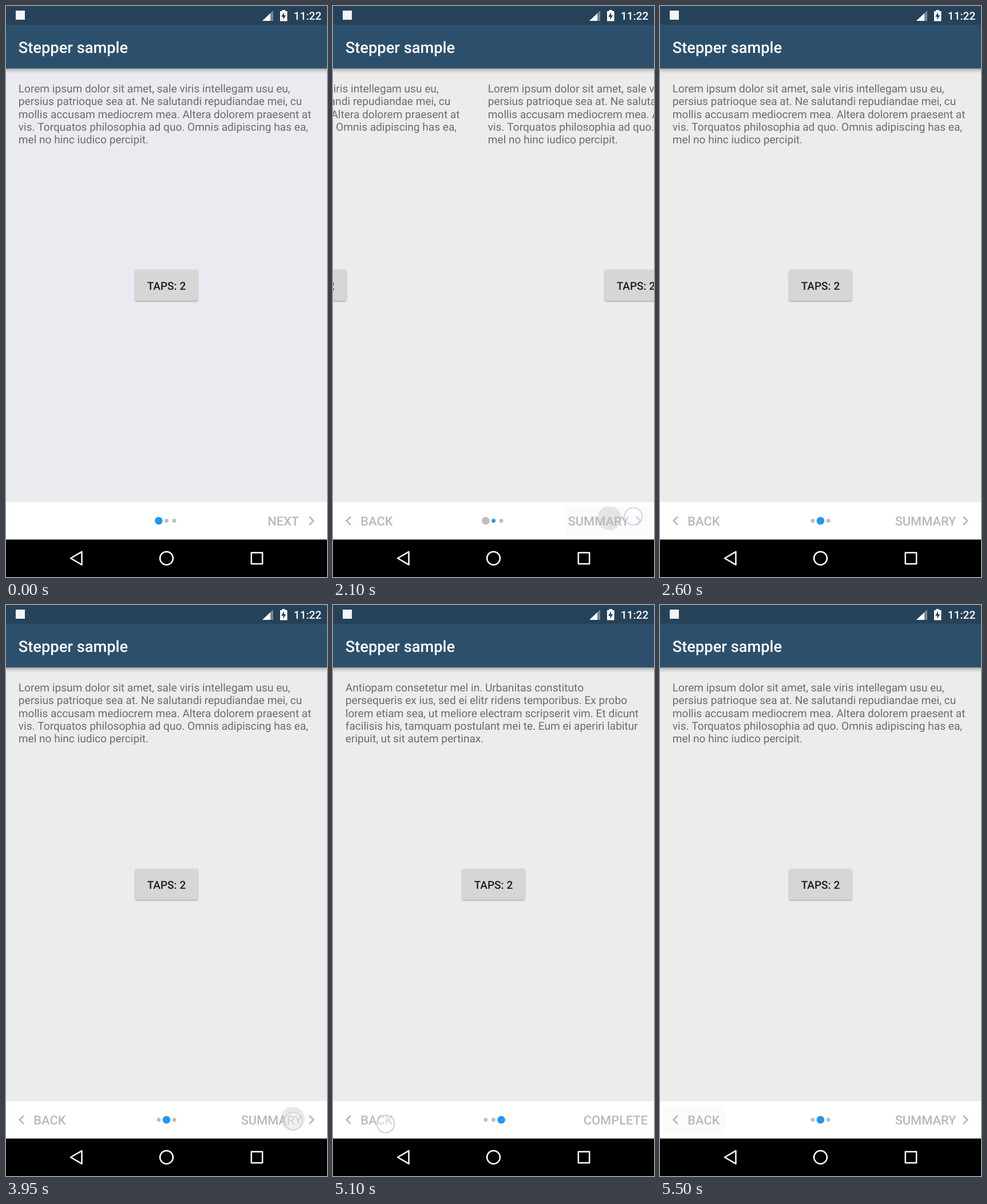
An HTML page with a canvas for the animation above (6.05 s loop, 561 by 998 pixels).

```html
<!DOCTYPE html>
<html lang="en">
<head>
<meta charset="utf-8">
<title>Stepper sample</title>
<style>
  html, body { margin: 0; width: 100%; height: 100%; overflow: hidden; background: #000; }
  canvas { display: block; }
</style>
</head>
<body>
<canvas id="stage" width="561" height="998"></canvas>
<script>
const WIDTH = 561, LOOP = 6050, STEP = 50;
const ctx = document.getElementById('stage').getContext('2d');
ctx.textRendering = 'geometricPrecision';

const LOREM = [
  'Lorem ipsum dolor sit amet, sale viris intellegam usu eu,',
  'persius patrioque sea at. Ne salutandi repudiandae mei, cu',
  'mollis accusam mediocrem mea. Altera dolorem praesent at',
  'vis. Torquatos philosophia ad quo. Omnis adipiscing has ea,',
  'mel no hinc iudico percipit.'
];
const ANTIOPAM = [
  'Antiopam consetetur mel in. Urbanitas constituto',
  'persequeris ex ius, sed ei elitr ridens temporibus. Ex probo',
  'lorem etiam sea, ut meliore electram scripserit vim. Et dicunt',
  'facilisis his, tamquam postulant mei te. Eum ei aperiri labitur',
  'eripuit, ut sit autem pertinax.'
];
const PAGES = [LOREM, LOREM, ANTIOPAM];
const FORWARD = [
  { label: 'NEXT', x: 484.65, align: 'center' },
  { label: 'SUMMARY', x: 517.4, align: 'right' },
  { label: 'COMPLETE', x: 550.1, align: 'right' }
];

// Page changes, each starting at the given time.
const MOVES = [
  { at: 2070, from: 0, to: 1 },
  { at: 3965, from: 1, to: 2 },
  { at: 5165, from: 2, to: 1 }
];
const TOUCHES = [
  { at: 1500, x: 500, y: 861, ring: '208,208,213' },
  { at: 2050, x: 525, y: 892, ring: '190,202,236',
    ripple: [483, 895], box: [406, 875, 149, 50], tint: age => 1 - age / 550 },
  { at: 3900, x: 502, y: 902, ring: '200,206,226',
    ripple: [501, 898], box: [431, 875, 124, 45], tint: () => 0 },
  { at: 5100, x: 92, y: 907, ring: '190,202,236',
    ripple: [63, 900], box: [5, 875, 110, 50], tint: () => 1 }
];

const clamp = v => Math.max(0, Math.min(1, v));
const mix = (a, b, k) => a + (b - a) * k;
const scrollEase = u => 1 - (1 - u) ** 5;
const dotEase = u => 1 - (1 - u) ** 2;

function rect(color, x, y, w, h) {
  ctx.fillStyle = color;
  ctx.fillRect(x, y, w, h);
}

function circle(x, y, r, fill, stroke, lineWidth) {
  ctx.beginPath();
  ctx.arc(x, y, r, 0, 7);
  paint(fill, stroke, lineWidth);
}

function polygon(points, fill, stroke, lineWidth) {
  ctx.beginPath();
  points.forEach(([x, y]) => ctx.lineTo(x, y));
  ctx.closePath();
  paint(fill, stroke, lineWidth);
}

function paint(fill, stroke, lineWidth) {
  if (fill) { ctx.fillStyle = fill; ctx.fill(); }
  if (stroke) { ctx.strokeStyle = stroke; ctx.lineWidth = lineWidth; ctx.stroke(); }
}

function text(string, x, y, size, color, align = 'left', weight = 500) {
  ctx.font = `${weight} ${size}px Roboto, sans-serif`;
  ctx.textAlign = align;
  ctx.fillStyle = color;
  ctx.fillText(string, x, y);
}

// Sets words one by one, so that spaces take no part in kerning.
function bodyLine(line, x, y) {
  for (const word of line.split(' ')) {
    text(word, x, y, 19.09, 'rgba(0,0,0,.54)', 'left', 400);
    x += ctx.measureText(word).width + ctx.measureText(' ').width;
  }
}

function drawPage(lines, left) {
  lines.forEach((line, i) => bodyLine(line, left + 21.8, 151.25 + i * 22.22));
  ctx.save();
  ctx.shadowColor = 'rgba(0,0,0,.35)';
  ctx.shadowBlur = 3;
  ctx.shadowOffsetY = 1.3;
  ctx.beginPath();
  ctx.roundRect(left + 226, 461.3, 109, 53.6, 2.5);
  paint('#d6d6d6');
  ctx.restore();
  text('TAPS: 2', left + 280.5, 495.6, 19.09, 'rgba(0,0,0,.87)', 'center');
}

function drawHeader() {
  const shade = ctx.createLinearGradient(0, 109, 0, 118);
  shade.addColorStop(0, 'rgba(0,0,0,.3)');
  shade.addColorStop(0.4, 'rgba(0,0,0,.13)');
  shade.addColorStop(1, 'rgba(0,0,0,0)');
  rect(shade, 0, 109, WIDTH, 9);
  rect('#2c506c', 0, 0, WIDTH, 109.15);
  rect('#264259', 0, 0, WIDTH, 32.75);
  text('Stepper sample', 21.8, 81.5, 27.27, '#fff');

  rect('#f2f5f7', 17, 8, 16, 16);
  polygon([[448, 26], [467, 26], [467, 8]], '#768897');
  polygon([[448, 26], [462, 26], [462, 12.7]], '#fff');
  rect('#fff', 482.5, 7, 5.5, 3);
  rect('#fff', 479, 9, 12.5, 17.5);
  polygon([[486, 11], [481, 18.7], [484.3, 18.7], [484.3, 24], [489.4, 16.2], [486, 16.2]], '#264259');
  text('11:22', 551.3, 24, 19.09, '#fff', 'right');
}

function drawSystemBar() {
  rect('#000', 0, 932.5, WIDTH, 66);
  ctx.lineJoin = 'round';
  polygon([[132.5, 953.8], [132.5, 976.7], [113, 965.25]], null, '#fff', 2.5);
  circle(280.5, 965.25, 11.4, null, '#fff', 2.5);
  polygon([[428.8, 955.6], [448.2, 955.6], [448.2, 975], [428.8, 975]], null, '#fff', 2.5);
}

// direction: 1 points right, -1 points left; x is the tip
function chevron(x, direction) {
  const shape = [[0, 0], [-8.2, -8.2], [-10.1, -6.3], [-3.9, 0], [-10.1, 6.3], [-8.2, 8.2]];
  polygon(shape.map(([dx, dy]) => [x + dx * direction, 899.75 + dy]), '#b9b9b9');
}

function drawTouchFeedback(touch, age) {
  if (!touch.box || age < STEP) return;
  ctx.save();
  ctx.beginPath();
  ctx.rect(...touch.box);
  ctx.clip();
  rect(`rgba(0,0,0,${0.016 * clamp(touch.tint(age))})`, ...touch.box);
  if (age < 200) {
    const fade = 1 - (age - STEP) / 150;
    circle(...touch.ripple, 21 + (age - STEP) * 0.1, `rgba(0,0,0,${0.09 * fade})`);
  }
  ctx.restore();
}

function drawPointer(touch, age) {
  if (age >= 250) return;
  const alpha = 1 - age / 250;
  circle(touch.x, touch.y, 15.3, `rgba(255,255,255,${0.5 * alpha})`,
    `rgba(${touch.ring},${0.9 * alpha})`, 2);
}

function drawStepperBar(move, time, touches) {
  rect('#fff', 0, 867, WIDTH, 66);
  touches.forEach(touch => drawTouchFeedback(touch, time - touch.at));

  const step = move ? move.to : 0;
  if (step > 0) {
    chevron(21.8, -1);
    text('BACK', 76.35, 908.4, 21.82, '#b9b9b9', 'center');
  }
  const { label, x, align } = FORWARD[step];
  text(label, x, 908.4, 21.82, '#b9b9b9', align);
  if (step < 2) chevron(539.2, 1);

  const growth = move ? dotEase(clamp((time - move.at - 50) / 300)) : 1;
  for (let i = 0; i < 3; i++) {
    let radius = 3.41;
    if (i === step) radius = mix(3.41, 6.82, growth);
    else if (move && i === move.from) radius = mix(6.82, 3.41, growth);
    circle(280.5 + (i - 1) * 13.64, 899.75, radius, i === step ? '#2196f3' : '#bdbdbd');
  }
}

function draw(time) {
  const move = MOVES.filter(m => time >= m.at).pop();
  const touches = TOUCHES.filter(touch => time >= touch.at);
  const position = move ? mix(move.from, move.to, scrollEase(clamp((time - move.at) / 200))) : 0;

  rect(time < 2050 ? '#eaebf0' : '#ececec', 0, 0, WIDTH, 998);
  PAGES.forEach((lines, i) => {
    const left = Math.round((i - position) * WIDTH);
    if (Math.abs(left) < WIDTH) drawPage(lines, left);
  });
  drawHeader();
  drawStepperBar(move, time, touches);
  drawSystemBar();
  touches.forEach(touch => drawPointer(touch, time - touch.at));
}

const start = performance.now();
function tick() {
  const time = (performance.now() - start) % LOOP;
  draw(Math.floor(time / STEP) * STEP);
  requestAnimationFrame(tick);
}
tick();
</script>
</body>
</html>
```
